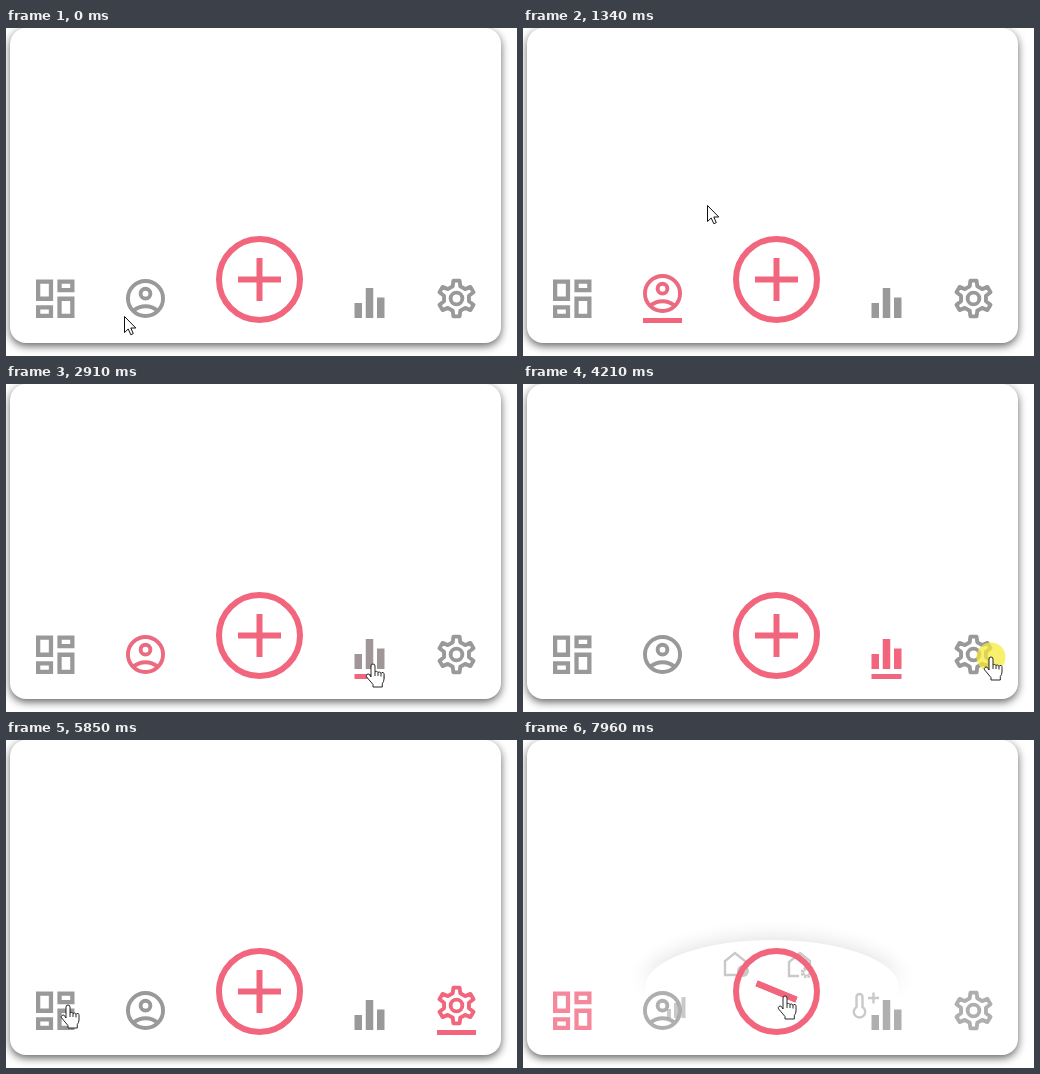
Animation of 511 by 328 pixels, one loop 8000 ms. Source, as an HTML page:

```html
<!DOCTYPE html>
<html lang="en">
<head>
<meta charset="utf-8">
<title>Tab bar</title>
<style>
  html, body { margin: 0; width: 100%; height: 100%; overflow: hidden; background: #fff; }
  .card {
    position: absolute; left: 4px; top: 0; width: 491px; height: 315px;
    border-radius: 16px; background: #fff; box-shadow: 0 3px 8px rgba(0, 0, 0, .62);
  }
  svg { position: absolute; left: 0; top: 0; }
  .line { fill: none; stroke: currentColor; stroke-width: 2; stroke-linejoin: round; }
  .square { stroke-linejoin: miter; }
</style>
</head>
<body>
<div class="card"></div>
<svg width="511" height="328" viewBox="0 0 511 328">
  <defs>
    <filter id="soft" x="-30%" y="-80%" width="160%" height="260%">
      <feGaussianBlur stdDeviation="10"/>
    </filter>
    <linearGradient id="fade" x1="0" y1="220" x2="0" y2="260" gradientUnits="userSpaceOnUse">
      <stop stop-color="#fff"/>
      <stop offset="1" stop-color="#000"/>
    </linearGradient>
    <mask id="upper" maskUnits="userSpaceOnUse" x="0" y="130" width="511" height="198">
      <rect y="130" width="511" height="198" fill="url(#fade)"/>
    </mask>
  </defs>

  <g id="menu">
    <g mask="url(#upper)">
      <ellipse cx="249" cy="244" rx="127" ry="46" opacity=".12" filter="url(#soft)"/>
      <ellipse cx="249" cy="247" rx="127" ry="47" fill="#fff"/>
    </g>
    <g fill="none" stroke="#c9c9c9" stroke-width="2.4">
      <path d="M213 235h-11v-14l10-8 10 8v5M276 236h-10v-14l11-9 10 8v5"/>
      <circle cx="220" cy="231" r="6" fill="#c9c9c9" stroke="none"/>
      <path d="M217 231l2 2 4-4" stroke="#fff" stroke-width="1.4"/>
      <circle cx="283.5" cy="232.5" r="4.6" stroke-dasharray="2.4 1.2"/>
      <circle cx="283.5" cy="232.5" r="3" stroke-width="1.5"/>
      <path d="M146 278v-9M153 278v-15M160.500 278v-21" stroke-width="4"/>
      <path d="M333.500 267v-10a3 3 0 0 1 6 0v10a5.700 5.700 0 1 1-6 0zM345 258h11M350.500 252.500v11"/>
    </g>
  </g>

  <g id="tabs"></g>

  <g transform="translate(253.5 251.5)" fill="none" stroke="#f2667d" stroke-width="6">
    <circle r="40.500"/>
    <path id="barA" d="M-21.500 0h43"/>
    <path id="barB" d="M-21.500 0h43"/>
  </g>

  <g id="pointer">
    <circle id="press" r="14.500" fill="#f7ea35" opacity=".72"/>
    <g fill="#fff" stroke="#111" stroke-linejoin="round">
      <path id="arrow" d="M.5.5V16.500L4.200 13l2.600 5.700 2.500-1.100L6.800 12h5z"/>
      <g id="hand" stroke-width=".9">
        <path d="M-2 13V2a2 2 0 0 1 4 0V8a1.800 1.800 0 0 1 3 .5a1.800 1.800 0 0 1 3 1a1.600 1.600 0 0 1 3 1.200V15q0 2.500-1.700 4.500V23H0V20.500L-6.500 12.800a1.900 1.900 0 0 1 2.800-2.400z"/>
        <path d="M2 8v4M5 8.500v3.500M8 9.500v3" fill="none"/>
      </g>
    </g>
  </g>
</svg>
<script>
const LOOP = 8000, BASE = 290, FADE = 700;
const GREY = [153, 153, 153], PINK = [242, 102, 125];
const $ = id => document.getElementById(id);
const ramp = (t, start, dur) => Math.max(0, Math.min(1, (t - start) / dur));
const smooth = p => p * p * (3 - 2 * p);
const easeInOut = p => p < .5 ? 4 * p ** 3 : 1 - 4 * (1 - p) ** 3;

// Each pointer trip: travel time, goal, height of the arc, then the press there
const start = { x: 118, y: 288 };
const trips = [
  { go: 50, stop: 270, x: 138, y: 277, arc: 0, press: 410, release: 670 },
  { go: 990, stop: 1940, x: 367, y: 280, arc: 156, press: 2510, release: 2710 },
  { go: 3400, stop: 4010, x: 468, y: 273, arc: 0, press: 4210, release: 4480 },
  { go: 4800, stop: 5850, x: 62, y: 265, arc: -45, press: 6050, release: 6240 },
  { go: 6200, stop: 7350, x: 262, y: 256, arc: 28, press: 7410, release: 7610 }
];
const [toPerson, toChart, toGear, toBoard, toAdd] = trips.map(s => s.release);

function gearPath() {
  const pts = [];
  for (let tooth = 0; tooth < 360; tooth += 60) {
    for (const [turn, r] of [[-17.3, 6.55], [-9.8, 9.3], [9.8, 9.3], [17.3, 6.55]]) {
      const a = (tooth + turn) * Math.PI / 180;
      pts.push([r * Math.sin(a), -r * Math.cos(a)]);
    }
  }
  return `M${pts.join('L')}Z`;
}

// Icons are drawn around 0,0 and are `units` wide
const tabs = [
  { cx: 49.25, w: 38.5, units: 18, on: toBoard, off: LOOP,
    art: '<path class="line square" d="M-8-8h6v8h-6zM2-8h6v4h-6zM2 0h6v8h-6zM-8 4h6v4h-6z"/>' },
  { cx: 139.5, w: 39, units: 20, on: toPerson, off: toChart,
    art: '<g class="line"><circle r="9"/><circle cy="-2.500" r="2.500"/><path d="M-6.200 6.200Q-3.500 4 0 4T6.200 6.200"/></g>' },
  { cx: 363.5, w: 30, units: 16, on: toChart, off: toGear,
    art: '<path fill="currentColor" d="M-8 0h4v8h-4zM-2-8h4V8h-4zM4-3h4V8h-4z"/>' },
  { cx: 450.5, w: 39, units: 20, on: toGear, off: toBoard,
    art: `<g class="line"><path d="${gearPath()}"/><circle r="3"/></g>` }
];
$('tabs').innerHTML = tabs.map(b =>
  `<g><g>${b.art}</g><rect x="${b.cx - b.w / 2}" y="${BASE}" height="5" fill="#f2667d"/></g>`).join('');
tabs.forEach((b, i) => [b.icon, b.bar] = $('tabs').children[i].children);

function drawTab(b, t) {
  // Opening the menu lowers a tab, but only another tab takes its colour
  const level = dur => ramp(t, b.on, dur) - ramp(t, Math.min(b.off, toAdd), dur);
  const tint = ramp(t, b.on, FADE) ** 2 - ramp(t, b.off, FADE) ** 2;
  const rgb = GREY.map((g, i) => Math.round(g + (PINK[i] - g) * tint));
  const y = BASE - b.w / 2 - 5 * level(150);
  b.icon.setAttribute('transform', `translate(${b.cx} ${y}) scale(${b.w / b.units})`);
  b.icon.style.color = `rgb(${rgb})`;
  b.bar.setAttribute('width', b.w * level(180));
}

function drawMenu(t) {
  const turn = smooth(ramp(t, toAdd, 700));
  $('barA').setAttribute('transform', `rotate(${45 * turn})`);
  $('barB').setAttribute('transform', `rotate(${90 - 135 * turn})`);

  const grow = ramp(t, toAdd, 350);
  $('menu').setAttribute('opacity', grow ** 2);
  $('menu').setAttribute('transform', `translate(250 250) scale(${.4 + .6 * grow}) translate(-250 -250)`);
  $('tabs').setAttribute('opacity', 1 - .22 * grow);
}

function pointerAt(t) {
  let { x, y } = start;
  for (const s of trips) {
    const p = easeInOut(ramp(t, s.go, s.stop - s.go));
    x += (s.x - x) * p;
    y += (s.y - y) * p - 4 * s.arc * p * (1 - p);
  }
  return [Math.round(x), Math.round(y)];
}

function overButton(x, y) {
  const onTab = b => Math.abs(x - b.cx) <= b.w / 2 && y >= 246 && y <= 296;
  return Math.hypot(x - 253.5, y - 251.5) < 43.5 || tabs.some(onTab);
}

function drawPointer(t) {
  const [x, y] = pointerAt(t);
  const show = (id, on) => $(id).style.display = on ? '' : 'none';
  const hand = overButton(x, y);
  $('pointer').setAttribute('transform', `translate(${x} ${y})`);
  show('hand', hand);
  show('arrow', !hand);
  show('press', trips.some(s => t >= s.press && t < s.release));
}

const began = performance.now();
function draw() {
  const t = (performance.now() - began) % LOOP;
  tabs.forEach(b => drawTab(b, t));
  drawMenu(t);
  drawPointer(t);
  requestAnimationFrame(draw);
}
draw();
</script>
</body>
</html>
```
